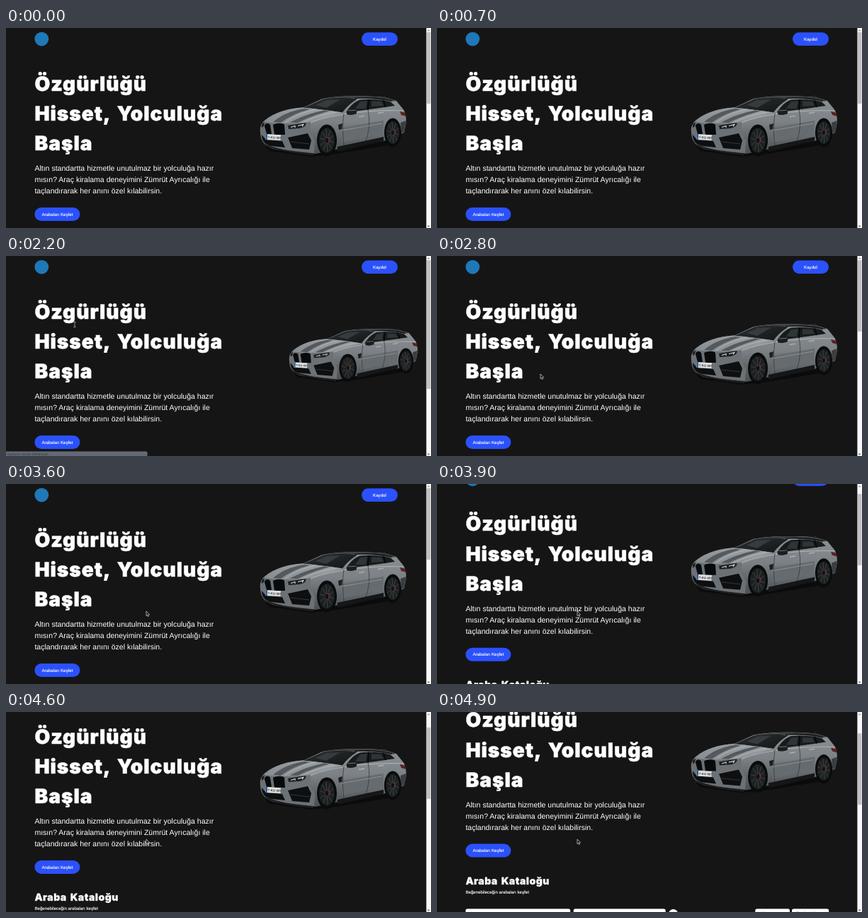
Write an HTML page that moves like this. It is 600 px wide and 283 px high and loops after 5 s.

```html
<!DOCTYPE html>
<html lang="tr">
<head>
<meta charset="utf-8">
<title>Araba Kataloğu</title>
<style>
  html, body { margin: 0; width: 100%; height: 100%; overflow: hidden; background: #161516; }
  svg { display: block; width: 100vw; height: 100vh; }
  text { font-family: "Liberation Sans", Arial, sans-serif; fill: #fff; text-rendering: geometricPrecision; }
  .black { font-family: Inter, "Liberation Sans", sans-serif; font-weight: 900;
    letter-spacing: .035em; word-spacing: .12em; stroke: #fff; stroke-width: .018em; }
  .hero { font-size: 28.1px; }
  .lead { font-size: 10.54px; }
  .small { font-size: 6.15px; stroke: #fff; stroke-width: .12px; }
  .mid { text-anchor: middle; }
  .dark { fill: #333; stroke: none; }
</style>
</head>
<body>
<svg viewBox="0 0 600 283" xmlns="http://www.w3.org/2000/svg">
  <defs>
    <linearGradient id="side" x1="0" y1="0" x2="0" y2="1">
      <stop offset="0" stop-color="#8c9194"/>
      <stop offset=".45" stop-color="#7c8185"/>
      <stop offset="1" stop-color="#4a4e51"/>
    </linearGradient>
    <linearGradient id="hood" x1="0" y1="1" x2="1" y2="0">
      <stop offset="0" stop-color="#878c90"/>
      <stop offset="1" stop-color="#9da2a5"/>
    </linearGradient>
    <linearGradient id="glass" x1="0" y1="0" x2="1" y2="1">
      <stop offset="0" stop-color="#2b2f31"/>
      <stop offset="1" stop-color="#131516"/>
    </linearGradient>
  </defs>

  <rect width="600" height="283" fill="#161516"/>

  <g id="page">
    <circle cx="50.3" cy="15.6" r="9.9" fill="#1f78b8"/>
    <rect x="502" y="6.2" width="51" height="18.8" rx="9.4" fill="#2b51fb"/>
    <text class="small mid" x="527.5" y="17.9">Kaydol</text>

    <g class="hero">
      <text class="black" x="40.4" y="88.8">Özgürlüğü</text>
      <text class="black" x="40.4" y="131">Hisset, Yolculuğa</text>
      <text class="black" x="40.4" y="173.1">Başla</text>
    </g>
    <g class="lead">
      <text x="40.4" y="202.4">Altın standartta hizmetle unutulmaz bir yolculuğa hazır</text>
      <text x="40.4" y="218.2">mısın? Araç kiralama deneyimini Zümrüt Ayrıcalığı ile</text>
      <text x="40.4" y="234">taçlandırarak her anını özel kılabilirsin.</text>
    </g>
    <rect x="40.4" y="254" width="64" height="19" rx="9.5" fill="#2b51fb"/>
    <text class="small mid" x="72.4" y="265.7">Arabaları Keşfet</text>

    <g id="car">
      <!-- underbody -->
      <path d="M362 164L436 178L556 155L552 164L468 178L430 182L372 174Z" fill="#0b0b0c"/>
      <!-- body -->
      <path d="M359 148C358 141 360 135 366 130C378 120 398 114 421 112L447 100C465 96 505 95 535 98L551 103L560 114C564 119 565 126 565 133L562 148L533 160L470 171L437 178L381 172C366 169 359 160 359 148Z" fill="url(#side)"/>
      <!-- roof -->
      <path d="M445 101C462 96 505 95 535 98L551 103L543 104C525 100 500 99 470 100Z" fill="#3c4042"/>
      <path d="M492 99.5C508 97.8 530 99 545 103" fill="none" stroke="#0d0e0f" stroke-width="1.2"/>
      <path d="M530 98L534 95.5L537 98.6Z" fill="#25282a"/>
      <!-- windscreen -->
      <path d="M420 113L447 101C465 98.5 480 98.5 496 100.5C487 106 480 112 475 119.5C457 117 438 114 420 113Z" fill="url(#glass)"/>
      <path d="M437 109L452 102L472 101L452 113Z" fill="#363b3e"/>
      <!-- side windows -->
      <path d="M480 119.5C485 111 492 104 500 101.5C518 100 532 101.5 543 104.5L549 110L525 113.5Z" fill="#181b1c"/>
      <path d="M493 114L500 104L510 103L508 114ZM516 111L516 103.5L530 104L533 110Z" fill="#2f3537"/>
      <path d="M512 101L511 116M533 102L536 112" stroke="#060707" stroke-width="1.6"/>
      <!-- bonnet -->
      <path d="M366 131C378 120 398 113 420 113C438 114 457 117 475 119.5C461 123 446 128 430 133C409 136 386 136 366 133Z" fill="url(#hood)"/>
      <path d="M377 133C387 124 402 117 421 114L429 115C411 120 397 127 388 134ZM401 134C414 126 432 120 449 116.5L457 117.5C439 122 424 128 412 134Z" fill="#55595d"/>
      <path d="M394 134C404 126 419 119 437 115.5M418 134C433 127 448 122 465 119" fill="none" stroke="#b9bdbf" stroke-width=".8"/>
      <!-- shoulder, doors and sill -->
      <path d="M430 134C455 123 510 115 562 117" fill="none" stroke="#a9aeb0" stroke-width="1.2"/>
      <path d="M474 141L533 131L532 149L474 162Z" fill="#666b6f"/>
      <path d="M477 121C475 136 475 150 477 166M511 116C514 130 513 146 508 160" fill="none" stroke="#35393b" stroke-width=".8"/>
      <path d="M474 145L531 135" stroke="#92979a" stroke-width=".9"/>
      <path d="M498 125.5L506 124.2M525 120.6L533 119.5" stroke="#b9bdbf" stroke-width="1.1"/>
      <path d="M469 137L475 135L474 143L470 144Z" fill="#1c1f21"/>
      <path d="M468 168L533 154L533 160L468 175Z" fill="#141617"/>
      <!-- mirror -->
      <path d="M481 120C481 115 487 114 495 115.5L495 121C490 123.5 484 123.5 481 122Z" fill="#1b1e20"/>
      <path d="M483 117L494 116.2" stroke="#777c7f" stroke-width=".9"/>
      <!-- front face -->
      <path d="M360 139L366 133C386 136 409 136 430 133L430 148L436 160L435 177L381 171C367 168 360 160 360 148Z" fill="#6c7175"/>
      <path d="M365 139C365 134 371 134 373 137L375 150L368 150ZM377 137C382 134 391 134 393 137L394 151L379 151Z" fill="#090a0b"/>
      <path d="M361 136L365 133L364 139L361 141ZM398 138L423 134C425 138 420 141 414 142L399 143Z" fill="#1d2023"/>
      <path d="M402 140.5L408 138.5L408 141M412 138.5L420 136.5L418 139.5" fill="none" stroke="#d5d9db" stroke-width="1.1"/>
      <path d="M361 151L367 158L390 160L394 169L374 167C365 165 361 159 361 151ZM398 155L426 149L431 159L428 172L404 170Z" fill="#0e0f10"/>
      <path d="M402 161L428 164" stroke="#33383a" stroke-width="1"/>
      <path d="M364 165C382 172 409 177 434 179" fill="none" stroke="#1b1d1f" stroke-width="2.4"/>
      <g transform="rotate(3 367 150)">
        <rect x="367" y="150.2" width="21" height="7.8" fill="#dfe1e2"/>
        <rect x="367" y="150.2" width="2.2" height="7.8" fill="#2759a8"/>
        <text x="369.8" y="156" font-size="4.4" font-weight="700" class="dark">T·KU 407</text>
      </g>
      <!-- rear -->
      <path d="M556 118L564 120L565 125L558 123Z" fill="#5a2022"/>
      <path d="M557 134L565 131L562 147L558 149Z" fill="#3a3e40"/>
      <g id="wheels"></g>
    </g>

    <text class="black" font-size="14.05" x="40.4" y="311.3">Araba Kataloğu</text>
    <text class="small" x="40.4" y="324.4">Beğenebileceğin arabaları keşfet</text>
    <g fill="#fff">
      <rect x="40.4" y="345.9" width="147.8" height="21" rx="2.5"/>
      <rect x="192.7" y="345.9" width="130" height="21" rx="2.5"/>
      <circle cx="333.6" cy="353" r="6.6"/>
      <rect x="449.3" y="345.9" width="48.7" height="16" rx="2.5"/>
      <rect x="501" y="345.9" width="52.2" height="16" rx="2.5"/>
    </g>
    <text class="small dark" x="454" y="354.5">Yakıt</text>
    <text class="small dark" x="507" y="354.5">Üretim Yılı</text>
  </g>

  <g id="status">
    <path d="M0 276.4H197.5Q199.6 276.4 199.6 278.5V283H0Z" fill="#d3e3fd"/>
    <text x="1.5" y="281.8" font-size="4.9" style="fill:#596273">sayfamız.studio bekleniyor...</text>
  </g>

  <rect x="593.4" width="6.6" height="283" fill="#f8f8f8"/>
  <path d="M594.8 4.2L596.6 2.2L598.4 4.2Z" fill="#8a8a8a"/>
  <path d="M594.8 279.8L596.6 281.8L598.4 279.8Z" fill="#505050"/>
  <rect id="thumb" x="594" width="5.4" fill="#c1c1c1"/>

  <g id="cursor">
    <path id="arrow" d="M0 0V6.6L1.5 5.3L2.5 7.5L3.6 7L2.6 4.9L4.6 4.7Z" fill="#111" stroke="#dcdcdc" stroke-width=".7"/>
    <path id="beam" d="M-1.6 -3.4H1.6M0 -3.4V3.4M-1.6 3.4H1.6" fill="none" stroke="#b4b4b4" stroke-width=".8"/>
  </g>
</svg>
<script>
  const LOOP = 5000, STEP = 100;
  const RELOAD = 1800, LOADED = 2500;
  const $ = id => document.getElementById(id);
  const clamp = v => Math.max(0, Math.min(1, v));

  // [time, value, value...] points
  const scrollKeys = [[3700, 0], [3800, 9], [3900, 22.3], [4000, 33], [4100, 40],
    [4200, 43.4], [4300, 44.1], [4600, 44.1], [4700, 49], [4800, 59], [4900, 67.4]];
  const cursorKeys = [[2000, 62, -8], [2200, 97, 97], [2500, 128, 146],
    [2800, 146, 167], [3100, 146, 167], [3600, 198, 180]];

  function sample(keys, t) {
    if (t <= keys[0][0]) return keys[0].slice(1);
    for (let i = 1; i < keys.length; i++) {
      const a = keys[i - 1], b = keys[i];
      if (t <= b[0]) {
        const k = (t - a[0]) / (b[0] - a[0]);
        return a.slice(1).map((v, j) => v + (b[j + 1] - v) * k);
      }
    }
    return keys[keys.length - 1].slice(1);
  }

  function wheel(x, y, rx, ry) {
    let spokes = '';
    for (let i = 0; i < 10; i++) {
      const a = i * Math.PI / 5 + .2;
      spokes += `M${x} ${y}L${x + Math.cos(a) * rx * .72} ${y + Math.sin(a) * ry * .72}`;
    }
    const oval = (k, fill) =>
      `<ellipse cx="${x}" cy="${y}" rx="${rx * k}" ry="${ry * k}" fill="${fill}"/>`;
    return oval(1, '#0a0b0b') + oval(.78, '#1d2021') +
      `<path d="M${x + rx * .2} ${y - ry * .2}q2 3 0 7" stroke="#7d2426" stroke-width="1.6" fill="none"/>` +
      `<path d="${spokes}" stroke="#43474a" stroke-width=".9"/>` + oval(.15, '#111');
  }
  $('wheels').innerHTML = wheel(453, 159, 14, 22.5) + wheel(546, 148, 12, 20.5);

  function draw(t) {
    const loading = t >= RELOAD && t < LOADED;
    const [scroll] = sample(scrollKeys, t);
    $('page').setAttribute('transform', `translate(0 ${-scroll})`);
    $('car').setAttribute('transform', loading ? 'translate(84 18.4) scale(.88)' : '');
    $('thumb').setAttribute('y', 6 + scroll * .36);
    $('thumb').setAttribute('height', loading ? 182 : 101);

    $('status').setAttribute('opacity', t < 1200 ? 0 : clamp((2270 - t) / 170));

    const [x, y] = sample(cursorKeys, t);
    const overHeading = t >= 2100 && t < 2400;
    const overLead = t >= 4200 && t < 4600;
    const beam = overHeading || overLead;
    $('cursor').setAttribute('transform', `translate(${x} ${overLead ? y + 5 : y})`);
    $('cursor').setAttribute('visibility', t < 2000 ? 'hidden' : 'visible');
    $('arrow').setAttribute('opacity', beam ? 0 : 1);
    $('beam').setAttribute('opacity', beam ? 1 : 0);
  }

  const start = performance.now();
  function frame() {
    const t = (performance.now() - start) % LOOP;
    draw(Math.floor(t / STEP) * STEP);
    requestAnimationFrame(frame);
  }
  frame();
</script>
</body>
</html>
```
